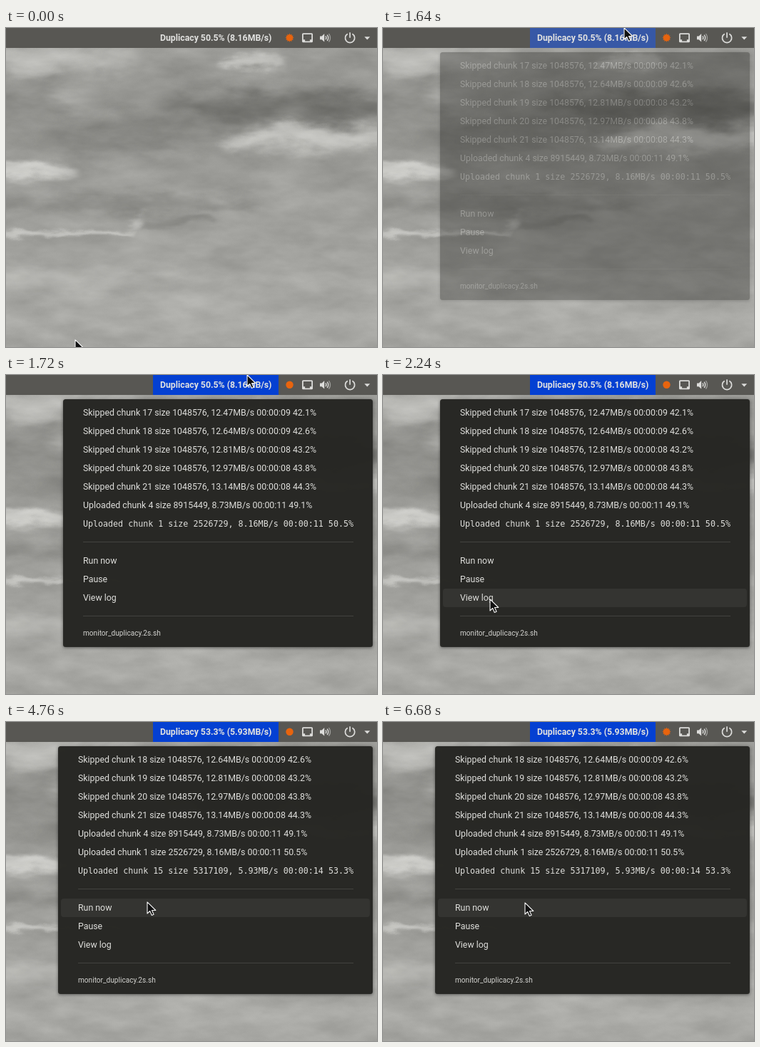
Write an HTML page that moves like this. It is 520 px wide and 448 px high and loops after 6920 ms.

```html
<!DOCTYPE html>
<html lang="en">
<head>
<meta charset="utf-8">
<title>Backup monitor menu</title>
<style>
  html, body { margin: 0; width: 520px; height: 448px; overflow: hidden; background: #a4a4a0; }
  svg { position: absolute; left: 0; top: 0; display: block; }
  text { font: 12.35px Roboto, sans-serif; fill: #dededb; white-space: pre; }
  .title { font-size: 12.27px; font-weight: 700; fill: #e2e2e0; }
  .mono { font: 11.66px "DejaVu Sans Mono", monospace; }
  .small { font-size: 10.1px; fill: #d2d2cf; }
  .line { fill: none; stroke: #dcdcda; }
  .solid { fill: #dcdcda; }
  #box { filter: drop-shadow(0 1.5px 2px rgba(0, 0, 0, .5)); }
</style>
</head>
<body>
<svg width="520" height="448" viewBox="0 0 520 448">
  <defs>
    <linearGradient id="haze" x2="0" y2="1"></linearGradient>
    <filter id="billow" filterUnits="userSpaceOnUse" x="-40" y="-40" width="600" height="528" color-interpolation-filters="sRGB">
      <feTurbulence type="fractalNoise" baseFrequency=".014 .035" numOctaves="4" seed="7" result="noise"/>
      <feColorMatrix in="noise" values="1 0 0 0 0  1 0 0 0 0  1 0 0 0 0  0 0 0 0 1" result="grain"/>
      <feDisplacementMap in="SourceGraphic" in2="noise" scale="36" xChannelSelector="R" yChannelSelector="G"/>
      <feComposite in2="grain" operator="arithmetic" k2="1" k3=".14" k4="-.07"/>
    </filter>
  </defs>
  <g id="sky" filter="url(#billow)">
    <rect x="-40" y="-40" width="600" height="528" fill="url(#haze)"/>
  </g>
</svg>
<svg width="520" height="448" viewBox="0 0 520 448">
  <rect width="520" height="28" fill="#585753"/>
  <rect id="hover" x="206" width="176" height="28" fill="#777672"/>
  <rect id="active" x="206" width="176" height="28" fill="#0440d2"/>
  <text id="title" class="title" x="216" y="18"></text>

  <circle id="dot" cx="397.5" cy="13.7" r="5.2" fill="#e8640e"/>
  <path id="burst" fill="#e8640e"/>
  <path class="solid" fill-rule="evenodd" d="M416.5 7.2h12q1.5 0 1.5 1.5v10q0 1.5-1.5 1.5h-12q-1.5 0-1.5-1.5v-10q0-1.5 1.5-1.5zM416.8 9v7.2h2.3v2.2h6.8v-2.2h2.3V9z"/>
  <path class="solid" d="M440 11.4h2.6l3.6-3.4v11.6l-3.6-3.4H440z"/>
  <path class="line" d="M448 11.4q1.8 2.4 0 4.8M450.2 9.6q3 4.2 0 8.4" stroke-width="1.4"/>
  <path class="line" d="M452.5 8q4 5.8 0 11.6" stroke-width="1.3" opacity=".55"/>
  <path class="line" d="M478.8 8.3a6.6 6.6 0 1 0 6.6 0M482.1 6.2v7.6" stroke-width="1.7"/>
  <path class="solid" d="M502.3 12.2h8l-4 4.2z"/>

  <g id="menu">
    <rect id="box" y="34" height="348" rx="3.5" fill="#272724" fill-opacity=".98"/>
    <rect id="row" height="26" rx="4" fill="#343431"/>
    <g id="content">
      <g id="rows"></g>
      <path id="rules" stroke="#43433f" fill="none"/>
    </g>
  </g>
  <path id="cursor" d="M0 .8V17l3.7-3.5 2.6 6 2.8-1.2-2.6-5.8h5.3z" fill="#111" stroke="#f4f4f4" stroke-width="1.1" stroke-linejoin="round"/>
</svg>
<script>
const LOOP = 6920, STEP = 40, CLICK = 1640, UPDATE = 3320;
const $ = id => document.getElementById(id);
const set = (el, attrs) => { for (const k in attrs) el.setAttribute(k, attrs[k]); return el; };
const add = (parent, tag, attrs) =>
  parent.appendChild(set(document.createElementNS('http://www.w3.org/2000/svg', tag), attrs));
const grey = v => `rgb(${v},${v},${v - 4})`;

// Sky: an even haze, then a few main clouds [x, y, rx, ry, tone] that the noise filter ruffles
[172, 152, 150, 158, 162, 170, 164].forEach((v, i, all) =>
  add($('haze'), 'stop', { offset: i / (all.length - 1), 'stop-color': grey(v) }));
for (const [cx, cy, rx, ry, v] of [
  [70, 42, 120, 18, 190],
  [40, 110, 90, 26, 138],
  [100, 88, 28, 26, 172],
  [400, 110, 190, 22, 108],
  [180, 152, 130, 22, 130],
  [430, 156, 122, 15, 206],
  [345, 46, 46, 9, 204],
  [20, 200, 75, 11, 212],
  [120, 246, 230, 13, 138],
  [230, 272, 60, 8, 138],
  [182, 272, 9, 10, 198],
  [75, 290, 115, 5, 202],
  [60, 350, 190, 14, 178]
]) add($('sky'), 'ellipse', { cx, cy, rx, ry, fill: grey(v), opacity: .85, style: `filter:blur(${ry * .45}px)` });

let burst = '';
for (let i = 0; i < 24; i++) {
  const a = i * Math.PI / 12, r = i % 2 ? 4.2 : 6.1;
  burst += `${i ? 'L' : 'M'}${397.5 + r * Math.cos(a)} ${13.7 + r * Math.sin(a)}`;
}
set($('burst'), { d: burst + 'z' });

const skipped = i => `Skipped chunk ${17 + i} size 1048576, ${(12.472 + .1675 * i).toFixed(2)}MB/s ` +
  `00:00:0${i < 2 ? 9 : 8} ${(42.08 + .56 * i).toFixed(1)}%`;
const log = [
  ...Array.from({ length: 5 }, (_, i) => skipped(i)),
  'Uploaded chunk 4 size 8915449, 8.73MB/s 00:00:11 49.1%',
  'Uploaded chunk 1 size 2526729, 8.16MB/s 00:00:11 50.5%',
  'Uploaded chunk 15 size 5317109, 5.93MB/s 00:00:14 53.3%'
];

let shown = -1;
function show(first) {
  if (first === shown) return;
  shown = first;
  const left = 80 - 7 * first, x = left + 28, lines = log.slice(first, first + 7);
  const [, rate, , percent] = lines[6].split(', ')[1].match(/(\S+) (\S+) (\S+)/);
  const label = (s, y, cls = '') => add($('rows'), 'text', { x, y, class: cls }).textContent = s;
  $('title').textContent = `Duplicacy ${percent} (${rate})`;
  $('rows').replaceChildren();
  lines.forEach((s, i) => label(s, 57 + 26 * i, i === 6 ? 'mono' : ''));
  ['Run now', 'Pause', 'View log'].forEach((s, i) => label(s, 265 + 26 * i));
  label('monitor_duplicacy.2s.sh', 366, 'small');
  set($('box'), { x: left, width: 514 - left });
  set($('row'), { x: left + 4, width: 506 - left });
  set($('rules'), { d: `M${x} 234.5H487M${x} 338.5H487` });
}

// Pointer moves: [start, end, x, y, easing]
const clamp = u => Math.min(1, Math.max(0, u));
const smooth = u => u * u * (3 - 2 * u);
const settle = u => 1 - (1 - u) ** 2;
const moves = [
  [800, 1280, 338, -1, smooth],
  [1840, 2240, 150, 314, smooth],
  [3400, 3640, 162, 290, settle],
  [4600, 4760, 198, 252, settle],
  [6400, 6440, 199, 253, settle]
];
function pointer(t) {
  let x = 97, y = 437;
  for (const [from, to, nx, ny, ease] of moves) {
    const p = ease(clamp((t - from) / (to - from)));
    x += (nx - x) * p;
    y += (ny - y) * p;
  }
  return [x, y];
}

function draw(ms) {
  const t = Math.floor(ms % LOOP / STEP) * STEP;
  const [x, y] = pointer(t), hit = pointer(t - STEP)[1];
  const open = t < CLICK ? 0 : clamp(.36 + (t - CLICK) / 100);
  show(t < UPDATE ? 0 : 1);
  set($('cursor'), { transform: `translate(${Math.round(x)} ${Math.round(y)})` });
  set($('hover'), { opacity: hit < 28 ? 1 : 0 });
  set($('active'), { opacity: open && clamp(open + .19) });
  set($('menu'), { opacity: open });
  set($('content'), { opacity: Math.sqrt(open) });
  const row = Math.floor((hit - 248) / 26);
  set($('row'), { y: 248 + 26 * row, opacity: row >= 0 && row < 3 ? 1 : 0 });
  const spiky = t < 1240 || t === CLICK || t >= 6640;
  set($('burst'), { opacity: spiky ? 1 : 0 });
  set($('dot'), { opacity: spiky ? 0 : 1 });
}

const start = performance.now();
function tick() {
  draw(performance.now() - start);
  requestAnimationFrame(tick);
}
tick();
</script>
</body>
</html>
```
